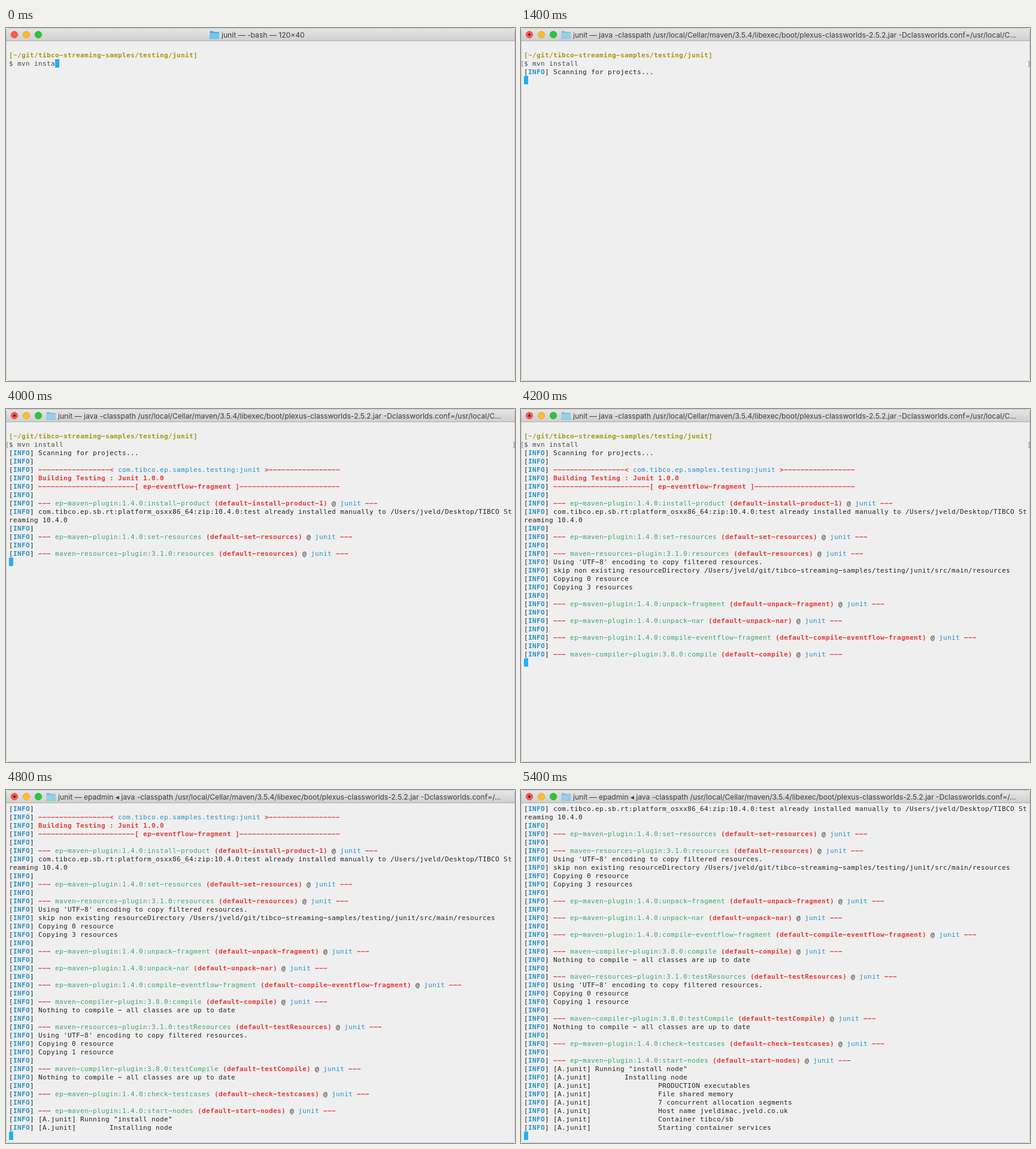
An HTML page for the animation above (8 s loop, 850x589 px).

```html
<!DOCTYPE html>
<html lang="en">
<head>
<meta charset="utf-8">
<title>Terminal</title>
<style>
  html, body { margin: 0; width: 100%; height: 100%; overflow: hidden; background: #fff; }
  svg { display: block; width: 850px; height: 589px; }
  #screen { font: 11px "DejaVu Sans Mono", monospace; font-variant-ligatures: none; }
  #title { font: 12.1px Inter, "DejaVu Sans", sans-serif; fill: #3d3d3d; }
  .text { fill: #242424; }
  .typed { fill: #484848; }
  .mark { fill: #858585; }
  .path { fill: #a6960f; font-weight: bold; }
  .info { fill: #2492c4; font-weight: bold; }
  .red { fill: #e53935; font-weight: bold; }
  .green { fill: #3aa76d; }
  .blue { fill: #2390c8; }
</style>
</head>
<body>
<svg viewBox="0 0 850 589" xmlns="http://www.w3.org/2000/svg">
  <defs>
    <linearGradient id="bar" x1="0" y1="0" x2="0" y2="1">
      <stop offset="0" stop-color="#e6e6e6"/>
      <stop offset="1" stop-color="#cecece"/>
    </linearGradient>
    <clipPath id="window"><rect width="850" height="589" rx="5"/></clipPath>
  </defs>
  <g clip-path="url(#window)">
    <rect width="850" height="589" fill="#efefef"/>
    <rect width="850" height="22" fill="url(#bar)"/>
    <rect y="21" width="850" height="1" fill="#b0b0b0"/>
    <circle cx="14" cy="11" r="5.7" fill="#fc5852" stroke="#de4640" stroke-width=".7"/>
    <circle cx="34" cy="11" r="5.7" fill="#fdbb2d" stroke="#dd9f2f" stroke-width=".7"/>
    <circle cx="54" cy="11" r="5.7" fill="#29c53f" stroke="#1fa832" stroke-width=".7"/>
    <circle id="dot" cx="14" cy="11" r="2" fill="#5c0d0a"/>
    <g id="folder">
      <path d="M0.5 13V1.5q0-1 1-1H5.5l1.5 1.6H15q1 0 1 1V13q0 .8-.8.8H1.3Q.5 13.800.5 13Z" fill="#4aa9d8"/>
      <path d="M.5 4H16V13q0 .8-.8.8H1.3Q.5 13.800.5 13Z" fill="#6cc8f2"/>
    </g>
    <text id="title" y="16"></text>
    <g id="screen"></g>
    <rect id="cursor" width="7" height="14" fill="#1cb1fb"/>
  </g>
  <rect x=".5" y=".5" width="849" height="588" rx="5" fill="none" stroke="#999" stroke-opacity=".4"/>
</svg>
<script>
const NS = "http://www.w3.org/2000/svg";
const LOOP = 8000, CELL = 7, ROW = 14, LEFT = 5, TOP = 24, ROWS = 40;
const $ = id => document.getElementById(id);

// Log lines are lists of [style, text] runs
const tag = [["text", "["], ["info", "INFO"], ["text", "] "]];
const info = (...runs) => [...tag, ...runs];
const say = text => info(["text", text]);
const gap = info();
const dashes = n => "-".repeat(n);
const goal = (plugin, id) => info(
  ["red", "--- "], ["green", plugin], ["red", ` (default-${id})`],
  ["text", " @ "], ["blue", "junit"], ["red", " ---"]);
const ep = (name, id = name) => goal("ep-maven-plugin:1.4.0:" + name, id);
const resources = name => goal("maven-resources-plugin:3.1.0:" + name, name);
const compiler = name => goal("maven-compiler-plugin:3.8.0:" + name, name);
const node = (depth, text) => say("[A.junit] " + " ".repeat(depth) + text);
const encoding = say("Using 'UTF-8' encoding to copy filtered resources.");
const upToDate = say("Nothing to compile - all classes are up to date");

const log = [
  say("Scanning for projects..."),
  gap,
  info(["red", dashes(17) + "< "], ["blue", "com.tibco.ep.samples.testing:junit"], ["red", " >" + dashes(17)]),
  info(["red", "Building Testing : Junit 1.0.0"]),
  info(["red", dashes(23) + "[ ep-eventflow-fragment ]" + dashes(24)]),
  gap,
  ep("install-product", "install-product-1"),
  say("com.tibco.ep.sb.rt:platform_osxx86_64:zip:10.4.0:test already installed manually to /Users/jveld/Desktop/TIBCO St"),
  [["text", "reaming 10.4.0"]],
  gap,
  ep("set-resources"),
  gap,
  resources("resources"),
  encoding,
  say("skip non existing resourceDirectory /Users/jveld/git/tibco-streaming-samples/testing/junit/src/main/resources"),
  say("Copying 0 resource"),
  say("Copying 3 resources"),
  gap,
  ep("unpack-fragment"),
  gap,
  ep("unpack-nar"),
  gap,
  ep("compile-eventflow-fragment"),
  gap,
  compiler("compile"),
  upToDate,
  gap,
  resources("testResources"),
  encoding,
  say("Copying 0 resource"),
  say("Copying 1 resource"),
  gap,
  compiler("testCompile"),
  upToDate,
  gap,
  ep("check-testcases"),
  gap,
  ep("start-nodes"),
  node(0, 'Running "install node"'),
  node(7, "Installing node"),
  node(15, "PRODUCTION executables"),
  node(15, "File shared memory"),
  node(15, "7 concurrent allocation segments"),
  node(15, "Host name jveldimac.jveld.co.uk"),
  node(15, "Container tibco/sb"),
  node(15, "Starting container services")
];

// Wide dashes, one glyph per terminal cell
function addWord(row, style, word, col) {
  const el = document.createElementNS(NS, "text");
  el.setAttribute("class", style);
  el.setAttribute("x", [...word].map((_, i) => LEFT + (col + i) * CELL).join(" "));
  el.setAttribute("y", 11);
  el.textContent = word.replace(/-/g, "\u2212");
  row.append(el);
  return el;
}

function addRow(runs) {
  const row = document.createElementNS(NS, "g");
  let col = 0;
  for (const [style, text] of runs) {
    for (const m of text.matchAll(/\S+/g)) addWord(row, style, m[0], col + m.index);
    col += text.length;
  }
  $("screen").append(row);
  return row;
}

const HEAD = 3;
const command = "$ mvn install";
const rows = [
  [],
  [["path", "[~/git/tibco-streaming-samples/testing/junit]"]],
  [],
  ...log
].map(addRow);
const typed = [...command].map((c, i) => addWord(rows[2], "typed", c, i));
const marks = [addWord(rows[2], "mark", "[", -1), addWord(rows[2], "mark", "]", 120)];
marks[0].setAttribute("x", -1);

const jar = "java -classpath /usr/local/Cellar/maven/3.5.4/libexec/boot/plexus-classworlds-2.5.2.jar -Dclassworlds.conf=/";
const titles = [
  [0, "junit — -bash — 120×40"],
  [600, `junit — ${jar}usr/local/C...`],
  [4800, `junit — epadmin ◂ ${jar}...`]
];
const typing = [[0, 11], [200, 12], [400, 13]];
const printed = [[0, 0], [1400, 1], [2400, 5], [2600, 7], [4000, 13], [4200, 25],
  [4400, 38], [4600, 40], [5200, 45], [5400, 46]];

const at = (steps, t) => steps.findLast(([start]) => start <= t)[1];
const show = (el, on) => el.setAttribute("display", on ? "inline" : "none");

function draw(t) {
  const running = t >= 400, busy = t >= 600;
  const chars = at(typing, t);
  const count = HEAD + at(printed, t);
  const scroll = Math.max(0, count + 1 - ROWS);

  rows.forEach((row, i) => {
    show(row, i >= scroll && i < count);
    row.setAttribute("transform", `translate(0 ${TOP + (i - scroll) * ROW})`);
  });
  typed.forEach((el, i) => show(el, i < chars));
  marks.forEach(el => show(el, running));

  $("cursor").setAttribute("x", LEFT + (running ? 0 : chars * CELL));
  $("cursor").setAttribute("y", TOP + (running ? count - scroll : HEAD - 1) * ROW);

  const title = at(titles, t);
  if ($("title").textContent !== title) $("title").textContent = title;
  $("title").setAttribute("x", busy ? 87 : 360);
  $("folder").setAttribute("transform", `translate(${busy ? 67 : 340} 4.500)`);
  $("folder").setAttribute("opacity", busy ? 0.6 : 1);
  show($("dot"), busy);
}

function tick(now) {
  draw(now % LOOP);
  requestAnimationFrame(tick);
}
draw(0);
requestAnimationFrame(tick);
</script>
</body>
</html>
```
